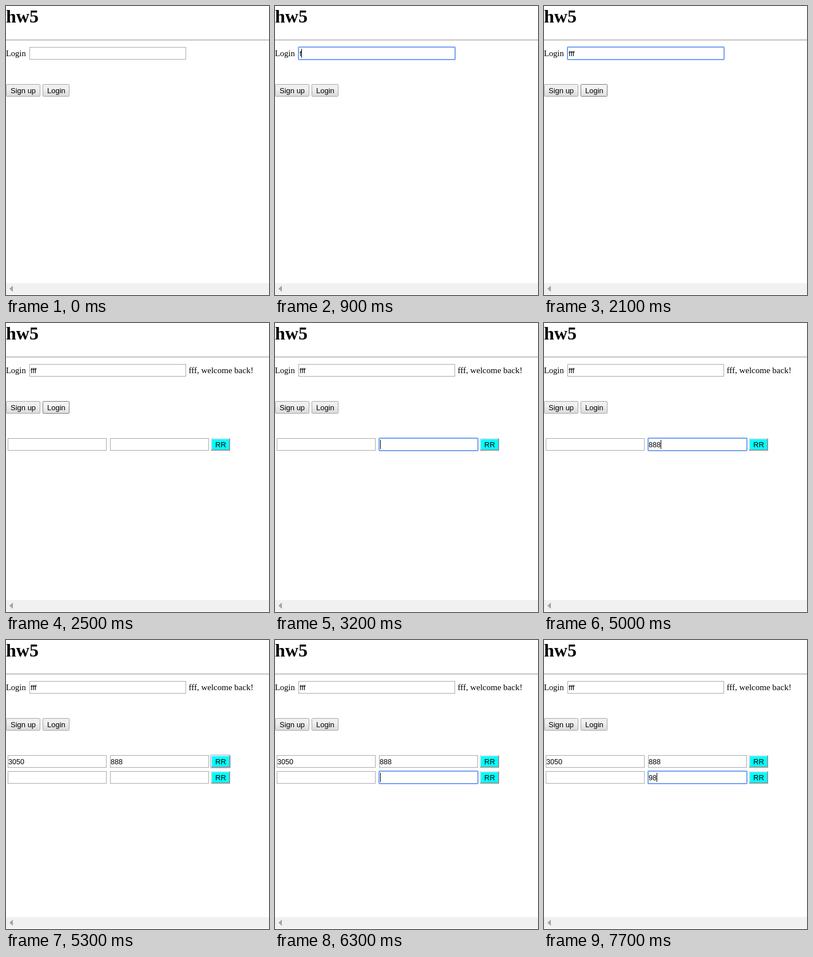
An HTML page for the animation above (8 s loop, 460 by 507 pixels).

```html
<!DOCTYPE html>
<html lang="en">
<head>
<meta charset="utf-8">
<title>hw5</title>
<style>
  html, body { margin: 0; width: 100%; height: 100%; overflow: hidden; background: #fff; }
  svg { display: block; }
  text { font: 13px "Liberation Sans", Arial, sans-serif; white-space: pre; }
  .num { font-size: 12.6px; }
  .serif { font: 15px "Liberation Serif", "Times New Roman", serif; }
  .label { font-size: 14.5px; }
  .title { font-weight: bold; font-size: 32px; }
</style>
</head>
<body>
<svg width="460" height="507" viewBox="0 0 460 507">
  <defs>
    <linearGradient id="idle" x2="0" y2="1"><stop offset=".35" stop-color="#f0f0f0"/><stop offset="1" stop-color="#dadada"/></linearGradient>
    <linearGradient id="hover" x2="0" y2="1"><stop offset=".35" stop-color="#f4f4f4"/><stop offset="1" stop-color="#dedede"/></linearGradient>
    <linearGradient id="down" x2="0" y2="1"><stop offset="0" stop-color="#d2d2d2"/><stop offset="1" stop-color="#e6e6e6"/></linearGradient>
  </defs>
  <text class="serif title" x="0" y="29">hw5</text>
  <path d="M0 59h460v1H0z" fill="#9a9a9a"/>
  <path d="M0 60h460v1H0z" fill="#eee"/>
  <text class="serif label" x="0" y="88">Login</text>
  <path d="M0 486h460v20H0z" fill="#f1f1f1"/>
  <path d="M6 496l6-5.5v11z" fill="#a3a3a3"/>
  <g id="live"></g>
</svg>
<script>
const LOOP = 8000, USER = "fff";
const live = document.getElementById("live");
const caretOff = [[2100, 2400], [3700, 4100], [4700, 4900], [6800, 7300]];

const within = (t, [from, to]) => t >= from && t < to;
const typed = (t, text, keys) => text.slice(0, keys.filter(k => t >= k).length);
const rect = (x, y, w, h, fill, extra = "") =>
  `<rect x="${x}" y="${y}" width="${w}" height="${h}" fill="${fill}" ${extra}/>`;
const label = (x, y, text, cls = "") => `<text class="${cls}" x="${x}" y="${y}">${text}</text>`;

// Outlined box whose 1px border lies inside x, y, w, h
const box = (x, y, w, h, fill, stroke, extra = "") =>
  rect(x + .5, y + .5, w - 1, h - 1, fill, `stroke="${stroke}" ${extra}`);

function field(x, y, w, focused) {
  return (focused ? box(x - 1, y - 1, w + 2, 24, "none", "#7ca8f4", 'rx="1"') : "") +
    box(x, y, w, 22, "#fff", focused ? "#6a9bec" : "#a9a9a9");
}

function caret(t, x, y) {
  return caretOff.some(span => within(t, span)) ? "" : rect(Math.floor(x), y, 1, 16, "#000");
}

function button(x, w, text, state = "idle") {
  const border = state == "idle" ? "#a6a6a6" : "#787878";
  return box(x, 137, w, 22, `url(#${state})`, border, 'rx="1"') + label(x + 8, 153, text);
}

function resetButton(y, focused, pressed) {
  const x = 358, w = 34, h = 22;
  const [lit, dark] = pressed ? ["#8f8f8f", "#e2e2e2"] : ["#e2e2e2", "#969696"];
  return (focused ? box(x - 1, y - 1, w + 2, h + 2, "none", "#a3bdf3", 'rx="1"') : "") +
    rect(x, y, w, h, dark) +
    `<path d="M${x} ${y}h${w}l-2 2l-30 18l-2 2z" fill="${lit}"/>` +
    rect(x + 2, y + 2, w - 4, h - 4, "#0ff") + label(x + 8, y + 16, "RR");
}

function row(t, y, result, guess, span, pressSpan, ringSpan) {
  const focused = within(t, span);
  return field(3, y, 173) + label(4, y + 16, result, "num") +
    field(182, y, 173, focused) + label(183, y + 16, guess, "num") +
    (focused ? caret(t, Math.max(184, 183 + 7 * guess.length), y + 3) : "") +
    resetButton(y, within(t, ringSpan), within(t, pressSpan));
}

function scene(t) {
  const never = [0, 0];
  const loginFocus = within(t, [600, 2400]);
  const name = typed(t, USER, [900, 1300, 1600]);
  const loginState = within(t, [2400, 2500]) ? "down" : within(t, [1800, 2800]) ? "hover" : "idle";

  let out = field(41, 72, 274, loginFocus) + label(43, 88, name);
  if (loginFocus) out += caret(t, 43 + 3.67 * name.length, 75);
  out += button(0, 60, "Sign up") + button(64, 47, "Login", loginState);

  if (t >= 2500) {
    out += label(319.5, 88, USER + ", welcome back!", "serif");
    out += row(t, 202, t >= 5300 ? "3050" : "", typed(t, "888", [4300, 4900, 5000]),
      [3200, 5200], [5200, 5300], [5200, 6300]);
  }
  if (t >= 5300)
    out += row(t, 230, "", typed(t, "98", [7500, 7700]), [6300, LOOP], never, never);
  return out;
}

let shown;
function tick() {
  const next = scene(performance.now() % LOOP);
  if (next !== shown) live.innerHTML = shown = next;
  requestAnimationFrame(tick);
}
tick();
</script>
</body>
</html>
```
